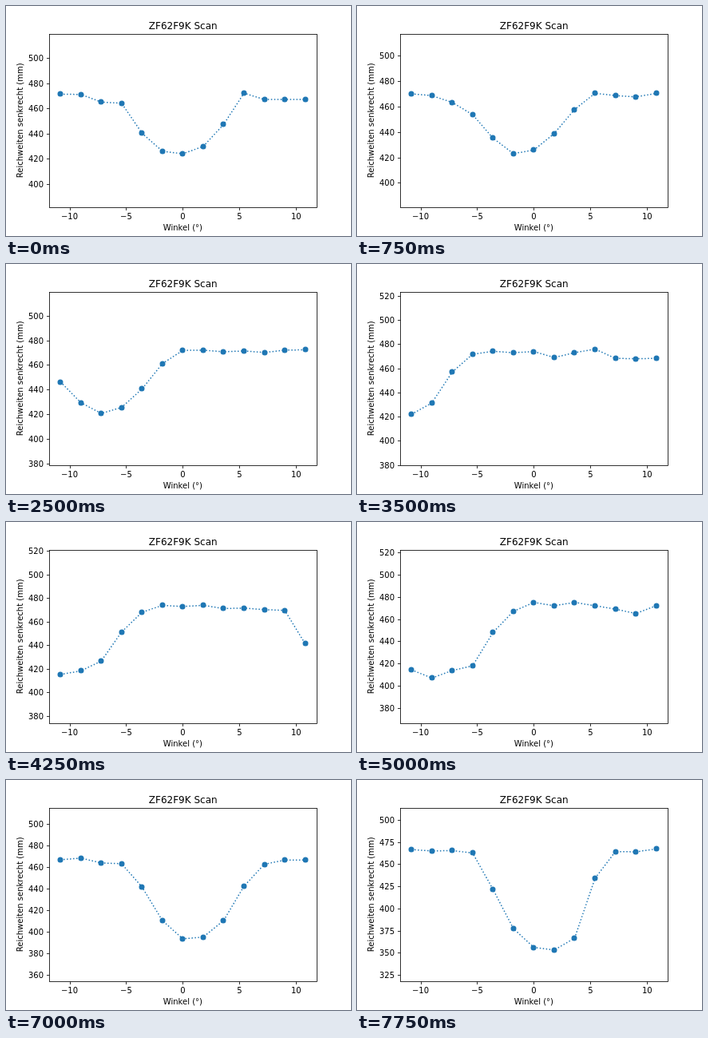
These frames come from a looping animation (432x288 px, 8000 ms). An HTML page:

```html
<!DOCTYPE html>
<html lang="de">
<head>
<meta charset="utf-8">
<title>Scan</title>
<style>
html, body { margin: 0; width: 432px; height: 288px; overflow: hidden; background: #fff; }
svg { display: block; }
text { font: 10px "DejaVu Sans", sans-serif; fill: #000; }
.title { font-size: 12px; }
.mid { text-anchor: middle; }
.end { text-anchor: end; }
.axis { fill: none; stroke: #000; stroke-width: 0.8; }
.curve { fill: none; stroke: #1f77b4; stroke-width: 1.5; stroke-dasharray: 1.5 2.475; stroke-linejoin: round; }
.dots { fill: #1f77b4; }
</style>
</head>
<body>
<svg width="432" height="288" viewBox="0 0 432 288">
  <polyline class="curve" id="curve"/>
  <g class="dots" id="dots"></g>
  <rect class="axis" x="54.5" y="35.5" width="335" height="217"/>
  <g id="xAxis"></g>
  <g id="yAxis"></g>
  <text class="title mid" x="221.7" y="29">ZF62F9K Scan</text>
  <text class="mid" x="221.4" y="281">Winkel (°)</text>
  <text class="mid" transform="translate(21 143.3) rotate(-90)">Reichweiten senkrecht (mm)</text>
</svg>
<script>
const STEP = 250, COUNT = 32, N = 13, GAP = 1.8;
const BOX = { left: 54, right: 388.8, top: 34.56, bottom: 252 };
const X_LIMIT = 11.8;

// Scans: step number, angle of the obstacle, distance per angle
const scans = [
  { at: 0, c: -0.8, v: [471.2, 471, 465, 464, 440.3, 426, 424, 429.8, 447.2, 472, 467, 467, 467] },
  { at: 6, c: -2, v: [470.4, 467.3, 459.3, 447.2, 428.5, 416.7, 430, 448, 466, 473, 469.2, 468, 470.4] },
  { at: 14, c: -12, v: [422, 431.4, 457, 471.7, 474.2, 473, 474, 469, 473, 476, 468.3, 468, 468.3] },
  { at: 20, c: -9, v: [414.3, 407, 413.7, 418, 448, 467, 475, 472, 475, 472, 469, 465, 472] },
  { at: 23, c: -0.9, v: [468.4, 465, 460.5, 447, 430, 425, 424, 437.7, 456, 472.8, 470.2, 469, 468.3] },
  { at: 28, c: 0.8, v: [466.7, 468.2, 463.7, 463, 441.4, 410.3, 393.4, 395, 410.3, 442.2, 462.5, 466.4, 466.5] },
  { at: 31, c: 1.2, v: [466.6, 465, 465.4, 462.7, 421.5, 377.2, 356, 353, 366.4, 434, 464.3, 464, 467.3] }
];

const byId = id => document.getElementById(id);
const mix = (a, b, k) => a + (b - a) * k;
const angle = i => (i - (N - 1) / 2) * GAP;
const px = a => mix(BOX.left, BOX.right, (a + X_LIMIT) / (2 * X_LIMIT));
const label = (cls, x, y, s) => `<text class="${cls}" x="${x}" y="${y}">${s}</text>`;
const tick = d => `<path class="axis" d="${d}"/>`;

// Reads a scan at any angle; outside its range the dip is mirrored
function sample(scan, a) {
  const end = angle(N - 1);
  if (Math.abs(a) > end + 1e-6) a = 2 * scan.c - a;
  const p = Math.min(N - 1, Math.max(0, a / GAP + (N - 1) / 2));
  const i = Math.min(N - 2, Math.floor(p));
  return mix(scan.v[i], scan.v[i + 1], p - i);
}

function distances(step) {
  let i = 0;
  while (i < scans.length - 2 && scans[i + 1].at <= step) i++;
  const a = scans[i], b = scans[i + 1];
  const k = (step - a.at) / (b.at - a.at);
  const c = mix(a.c, b.c, k);
  return Array.from({ length: N }, (_, j) =>
    mix(sample(a, angle(j) + a.c - c), sample(b, angle(j) + b.c - c), k));
}

function draw(step) {
  const v = distances(step);
  const lo = Math.min(...v) * 0.9, hi = Math.max(...v) * 1.1;
  const py = d => mix(BOX.bottom, BOX.top, (d - lo) / (hi - lo));

  byId("curve").setAttribute("points",
    v.map((d, i) => `${px(angle(i)).toFixed(2)},${py(d).toFixed(2)}`).join(" "));
  byId("dots").innerHTML = v.map((d, i) =>
    `<circle cx="${Math.round(px(angle(i)))}" cy="${Math.round(py(d))}" r="3.5"/>`).join("");

  const gap = [10, 20, 25, 50].find(s => s >= (hi - lo) / 9);
  let out = "";
  for (let d = Math.ceil(lo / gap) * gap; d <= hi; d += gap) {
    const y = Math.round(py(d));
    out += tick(`M51 ${y + 0.5}H54.5`) + label("end", 47, y + 4, d);
  }
  byId("yAxis").innerHTML = out;
}

byId("xAxis").innerHTML = [-10, -5, 0, 5, 10].map(a => {
  const x = px(a);
  return tick(`M${Math.round(x) + 0.5} 252.5V256`) +
    label("mid", x, 267, String(a).replace("-", "\u2212"));
}).join("");

let shown = -1;
function play(now) {
  const step = Math.floor(now / STEP) % COUNT;
  if (step !== shown) draw(shown = step);
  requestAnimationFrame(play);
}
draw(shown = 0);
requestAnimationFrame(play);
</script>
</body>
</html>
```
